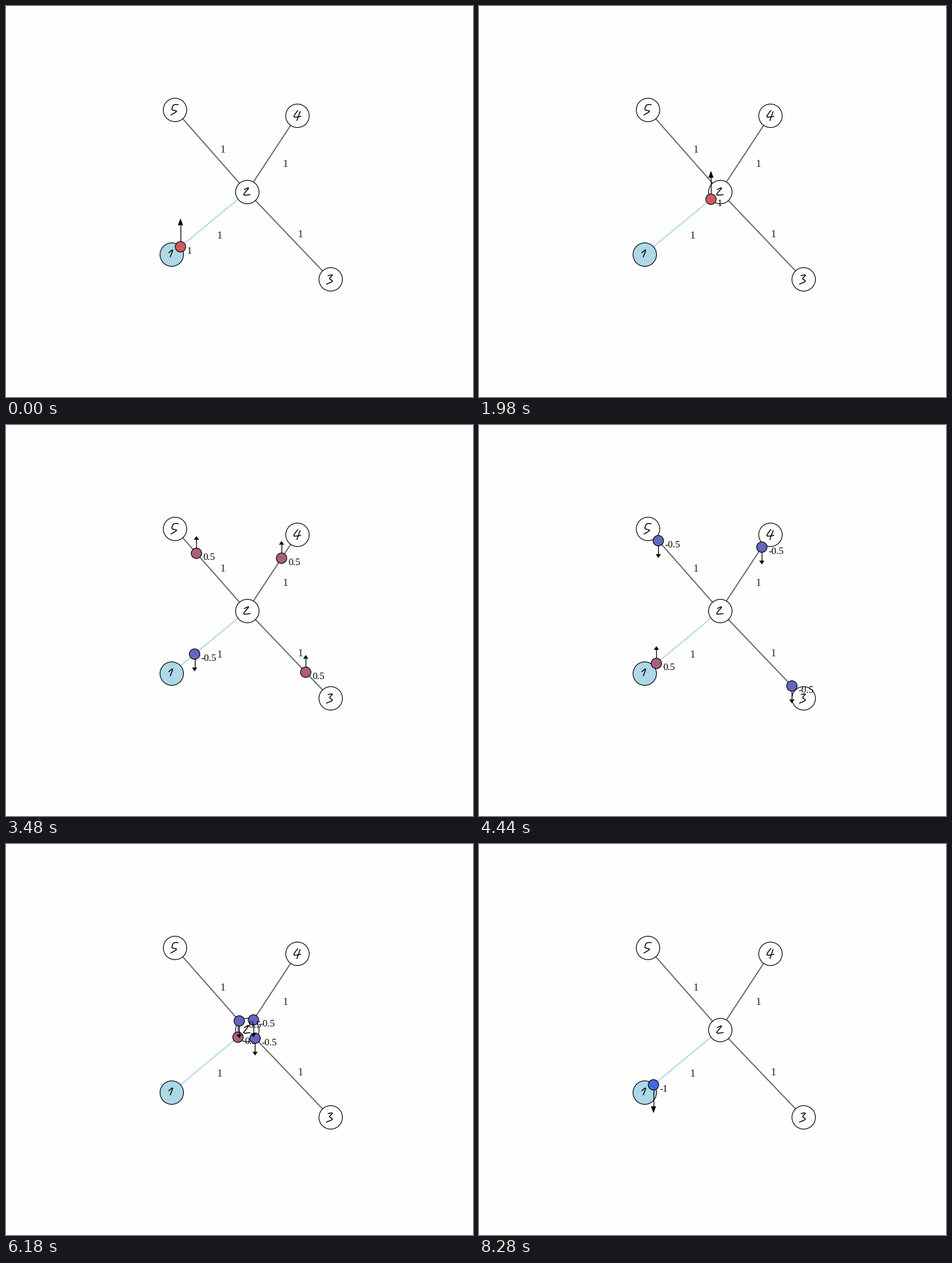
Write a matplotlib script that moves like this. It is 717 by 600 pixels and loops after 8.4 s.

```python
import numpy as np
import matplotlib.pyplot as plt
from matplotlib.animation import FuncAnimation
from matplotlib.patches import Circle, Polygon

W, H, DPI = 717, 600, 64
PT = 72 / DPI               # points per pixel
LEGS, LEG, STEP = 4, 35, 60
R = 18                      # node radius
HUB = 2
BLUE, RED = np.array([65, 105, 225]), np.array([205, 92, 92])

# Nodes are discs around these pixels; everything else is drawn half a pixel off
NODES = {n: np.array(p) for n, p in enumerate(
    [(254, 381), (370, 285), (498, 419), (447, 168), (259, 159)], 1)}
LEAVES = [n for n in NODES if n != HUB]

# Key points of the handwritten digits, relative to the node centre
DIGITS = {
    1: [[(-4, -2.4), (1.8, -6.5), (-1.8, 4)]],
    2: [[(-4, -3.4), (2.4, -5.6), (-5, 4.6), (5, 4.4)]],
    3: [[(-3.6, -5.4), (3, -6), (-1, -0.6), (3, 3.4), (-6, 7.8)]],
    4: [[(1, -7.6), (-5, 2), (5.6, 1.4)], [(4.6, -6), (-0.4, 7.8)]],
    5: [[(5.4, -7.6), (-1.6, -7), (-4, 0), (2.8, 2.6), (-5.8, 8.2)]],
}


def spline(points, n=10):
    """Catmull-Rom curve through the points."""
    p = np.array([points[0], *points, points[-1]], float)
    t = np.linspace(0, 1, n)[:, None]
    return np.vstack([
        0.5 * (2 * b + (c - a) * t + (2 * a - 5 * b + 4 * c - d) * t**2
               + (3 * b - a - 3 * c + d) * t**3)
        for a, b, c, d in zip(p, p[1:], p[2:], p[3:])])


def rim(a, b):
    """Point on the rim of node a that faces node b."""
    d = NODES[b] - NODES[a]
    return NODES[a] + R * d / np.hypot(*d)


def weight_pos(leaf):
    """Beside the middle of an edge, always on its right."""
    dx, dy = NODES[leaf] - NODES[HUB]
    nx, ny = np.array([dy, -dx]) / np.hypot(dx, dy) * (1 if dy > 0 else -1)
    return (NODES[leaf] + NODES[HUB]) / 2 + (24 * nx, 14.5 * ny + 9)


def scatter(v):
    """Waves leaving a junction for the waves that arrive."""
    return 2 * v.mean() - v


def ease(u, a=0.2):
    """Speed up over a, run evenly, slow down over a."""
    u = min(u, 1)
    if u > 0.5:
        return 1 - ease(1 - u, a)
    v = 1 / (1 - a)
    return v * u * u / (2 * a) if u < a else v * (u - a / 2)


fig = plt.figure(figsize=(W / DPI, H / DPI), dpi=DPI, facecolor="#fefefe")
ax = fig.add_axes([0, 0, 1, 1])
ax.set(xlim=(0, W), ylim=(H, 0))
ax.axis("off")


def line(points, color, width, **kw):
    x, y = np.transpose(points)
    return ax.plot(x, y, color=color, lw=width * PT, zorder=3, **kw)[0]


def disc(center, r, fill, width):
    return ax.add_patch(Circle(center, r, fc=fill, ec="black", lw=width * PT, zorder=3))


def label(x, y, s, size, **kw):
    return ax.text(x, y, s, family="Liberation Serif", size=size * PT, zorder=3, **kw)


class Pulse:
    """A ball on the edge between the hub and a leaf, with arrow and value."""

    def __init__(self, leaf):
        self.inner, self.outer = rim(HUB, leaf), rim(leaf, HUB)
        self.shaft = line([(0, 0), (0, 0)], "black", 1.2)
        self.head = ax.add_patch(Polygon([(0, 0)] * 3, fc="black", lw=0, zorder=3))
        self.ball = disc((0, 0), 8, "white", 1.1)
        self.text = label(0, 0, "", 15, color="black")
        self.parts = (self.shaft, self.head, self.ball, self.text)

    def show(self, value, s):
        """Place the pulse at s: 0 at the hub, 1 at the leaf."""
        for part in self.parts:
            part.set_visible(value != 0)
        if not value:
            return
        x, y = self.inner + s * (self.outer - self.inner)
        up, size = -np.sign(value), abs(value)
        tip = y + up * (9.5 + 34 * size)
        base = tip - up * (1 + 9.5 * size)
        self.shaft.set_data([x, x], [y, base])
        self.head.set_xy([(x, tip), (x - 4, base), (x + 4, base)])
        self.ball.center = x, y
        self.ball.set_facecolor((BLUE + (RED - BLUE) * (value + 1) / 2) / 255)
        self.text.set_position((x + 10, y + 10.5))
        self.text.set_text(f"{value:g}")


for leaf in LEAVES:
    line([rim(HUB, leaf), rim(leaf, HUB)], "lightblue" if leaf == 1 else "dimgray", 1.8)
    label(*weight_pos(leaf), "1", 17, color="#2b2b2b", ha="center", va="center")
for n, center in NODES.items():
    disc(center + 0.5, R, "lightblue" if n == 1 else "white", 1.1)
    for stroke in DIGITS[n]:
        line(spline(stroke) + center, "black", 1.4, solid_capstyle="round")

pulses = [Pulse(leaf) for leaf in LEAVES]

# Inward, scattered at the hub, flipped at the leaves, scattered again
waves = [np.array([1.0, 0, 0, 0])]
for leg in range(1, LEGS):
    waves.append(scatter(waves[-1]) if leg % 2 else -waves[-1])


def update(i):
    leg, k = divmod(i, LEG)
    s = ease((k + 0.2) / (LEG - 2))
    for pulse, value in zip(pulses, waves[leg]):
        pulse.show(value, s if leg % 2 else 1 - s)


anim = FuncAnimation(fig, update, frames=LEGS * LEG, interval=STEP,
                     repeat=True, repeat_delay=0, blit=False)
plt.show()
```
